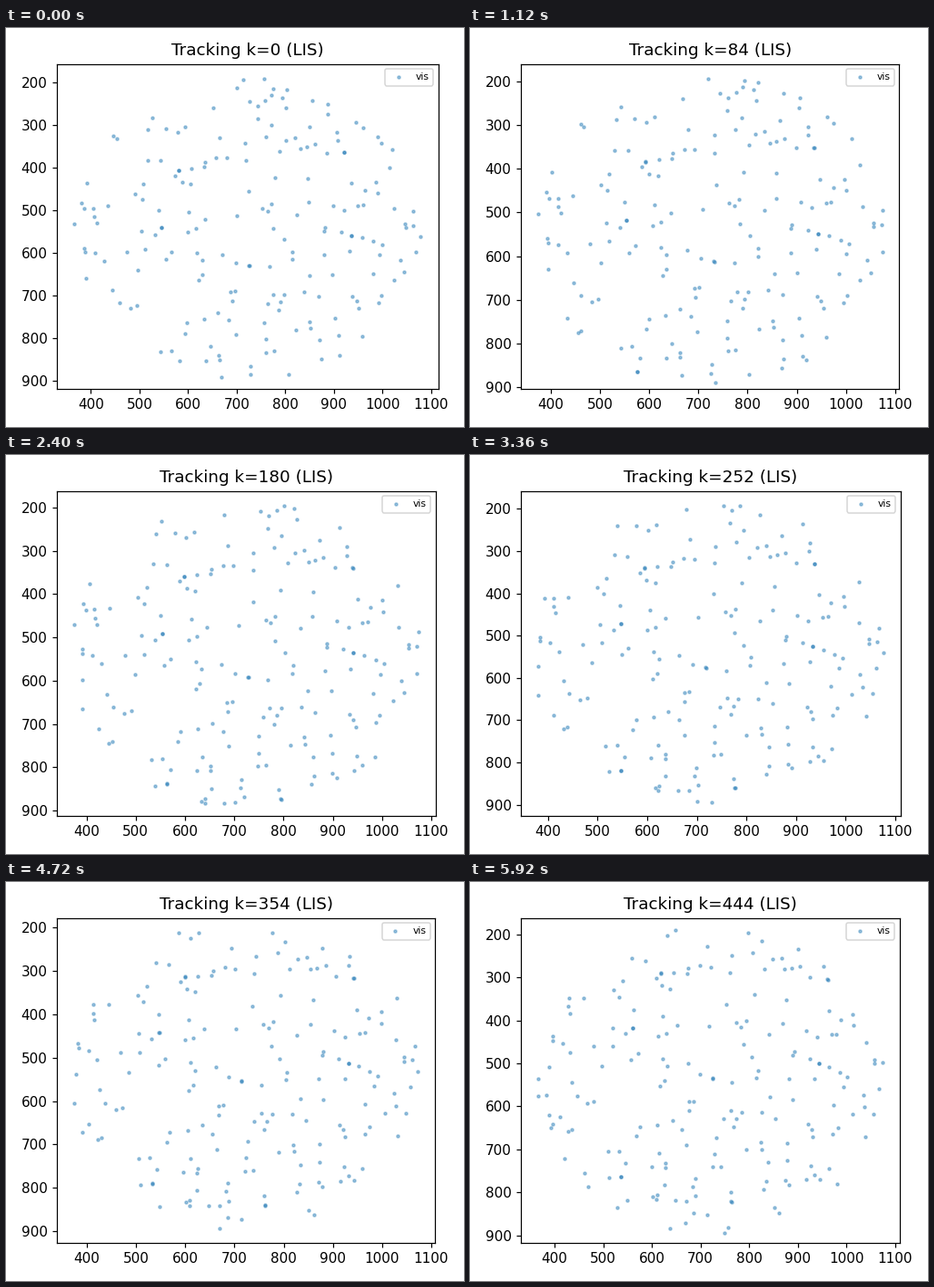
Recreate the animation shown at these times as a matplotlib script. Size 504 by 440 pixels, loop 6000 ms.

```python
import numpy as np
import matplotlib.pyplot as plt
from matplotlib.animation import FuncAnimation

DPI = 110
FRAMES, INTERVAL, STEP = 75, 80, 6
PIVOT = np.array([722.0, 537.0])
VIEW, RADIUS = np.array([722.0, 539.0]), 358
SPIN, RISE = 3.74e-4, -0.2135  # per unit of k

# Outermost points: these set the axis limits
EDGE = np.array([
    (366, 533), (396, 726), (380, 731),
    (1064, 503), (1064, 536), (1079, 561),
    (756, 191), (713, 194), (701, 213), (772, 230),
    (726, 245), (743, 255), (743, 284), (555, 308),
    (806, 885), (658, 916), (651, 922), (739, 945), (727, 971), (698, 988),
], float)


def spread(count, gap, rng):
    """Random points that keep a small distance from each other."""
    pts = list(EDGE)
    while len(pts) < len(EDGE) + count:
        p = rng.uniform((362, 182), (1082, 990))
        if np.hypot(*(np.array(pts) - p).T).min() > gap:
            pts.append(p)
    return np.array(pts[len(EDGE):])


rng = np.random.default_rng(7)
FIELD = spread(245, 8, rng)
TWINS = FIELD[:8] + rng.normal(0, 1, (8, 2))
POINTS = np.vstack([EDGE, FIELD, TWINS])


def sway(k):
    swing = np.cos(np.radians(k - 130)) - np.cos(np.radians(130))
    return 6.3 * swing + 5.6 * (k / 444) ** 8


def visible(points, k):
    a = SPIN * k
    turn = np.array([[np.cos(a), -np.sin(a)], [np.sin(a), np.cos(a)]])
    pos = PIVOT + (points - PIVOT) @ turn.T + (sway(k), RISE * k)
    return pos[np.hypot(*(pos - VIEW).T) < RADIUS]


def padded(values):
    pad = 0.05 * np.ptp(values)
    return values.min() - pad, values.max() + pad


fig, ax = plt.subplots(figsize=(504 / DPI, 440 / DPI), dpi=DPI)


def draw(i):
    k = STEP * i
    ax.clear()
    ax.scatter(*visible(POINTS, k).T, s=4, color="C0", alpha=0.4, label="vis")
    xs, ys = visible(EDGE, k).T
    ax.set_xlim(*padded(xs))
    ax.set_ylim(*padded(ys)[::-1])
    ax.set_title(f"Tracking k={k} (LIS)")
    ax.legend(loc="upper right", fontsize=7)
    fig.subplots_adjust(left=0.125, right=0.9, bottom=0.11, top=0.88)
    fig.tight_layout()


anim = FuncAnimation(fig, draw, frames=FRAMES, interval=INTERVAL,
                     repeat=True, repeat_delay=0, blit=False)
plt.show()
```
